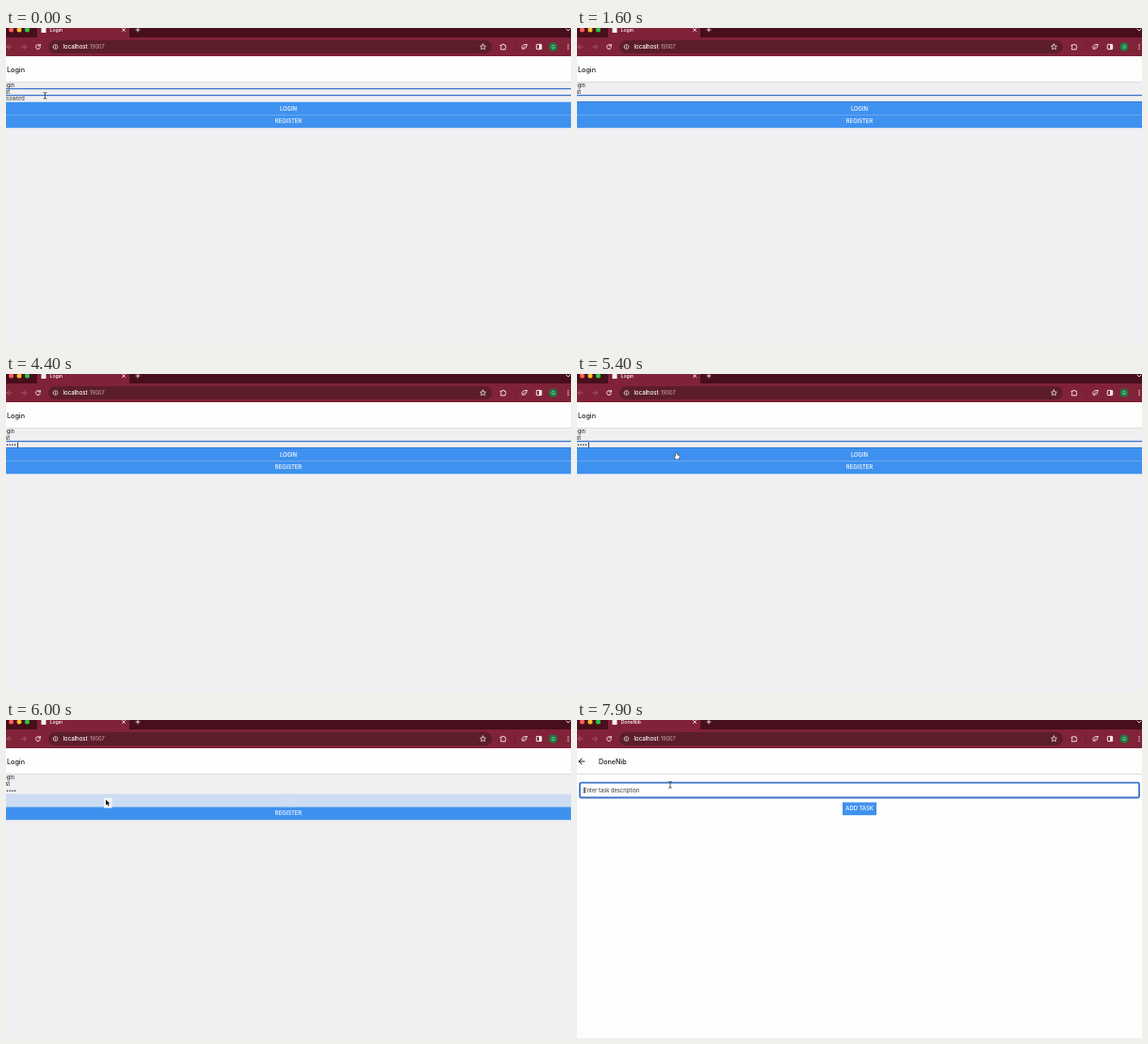
Animation, 600 px wide and 338 px high, one loop 8 s. Source, as an HTML page with a canvas:

```html
<!DOCTYPE html>
<html lang="en">
<head>
<meta charset="utf-8">
<style>
  html, body { margin: 0; width: 100%; height: 100%; overflow: hidden; }
  canvas { display: block; }
</style>
</head>
<body>
<canvas width="600" height="338"></canvas>
<script>
const ctx = document.querySelector('canvas').getContext('2d');
const LOOP = 8000, STEP = 100;
const BLUE = '#3f91ef', FOCUS = '#3c74c8', INK = '#1c1c1e', PALE = '#f3e6e9';
const APP = 'DoneNib';

// Moments of the story, in ms
const FOCUS_PASSWORD = 400, PRESS = 5700, RELEASE = 6000, NAVIGATE = 6200, FOCUS_TASK = 6900;
const KEYS = [1000, 1100, 1900, 2500, 3800, 4300];
const MOUSE = [[0, 41.5, 72], [100, 41.5, 72], [500, 42, 75], [4700, 42, 75],
  [5400, 106, 86], [6200, 106, 86], [6600, 99, 69], [LOOP, 99, 69]];

const clamp = v => Math.max(0, Math.min(1, v));
const ease = v => v * v * (3 - 2 * v);
const blinkOn = since => since % 1000 < 500;

function rect(x, y, w, h, color) {
  ctx.fillStyle = color;
  ctx.fillRect(x, y, w, h);
}

function rounded(x, y, w, h, r, fill, stroke, width = 1) {
  ctx.beginPath();
  ctx.roundRect(x, y, w, h, r);
  if (fill) { ctx.fillStyle = fill; ctx.fill(); }
  if (stroke) { ctx.strokeStyle = stroke; ctx.lineWidth = width; ctx.stroke(); }
}

function disc(x, y, r, fill) {
  ctx.beginPath();
  ctx.arc(x, y, r, 0, 7);
  ctx.fillStyle = fill;
  ctx.fill();
}

function path(d, x, y, { fill, stroke, width = 0.9 }) {
  const shape = new Path2D(d);
  ctx.save();
  ctx.translate(x, y);
  ctx.lineWidth = width;
  ctx.lineJoin = ctx.lineCap = 'round';
  if (stroke) { ctx.strokeStyle = stroke; ctx.stroke(shape); }
  if (fill) { ctx.fillStyle = fill; ctx.fill(shape); }
  ctx.restore();
}

function text(str, x, baseline, size, color, weight = 400, align = 'left') {
  ctx.font = `${weight} ${size}px Inter, sans-serif`;
  ctx.textAlign = align;
  ctx.fillStyle = color;
  ctx.fillText(str, x, baseline);
}

function drawBrowser(title) {
  rect(0, 0, 600, 10, '#470e1b');
  rect(0, 10, 600, 20, '#802238');
  rounded(33, -6, 98, 22, 4, '#802238');
  ['#fe5f57', '#febc2e', '#28c840'].forEach((c, i) => disc(5.5 + i * 8.5, 2, 2.5, c));
  rect(37.5, -1, 5, 6, '#f4f4f4');
  text(title, 46.5, 4, 5.2, '#fff', 500);

  const line = (d, x, y, stroke = PALE, width) => path(d, x, y, { stroke, width });
  line('M-1.5-1.5L1.5 1.5M1.5-1.5L-1.5 1.5', 125, 2);
  line('M-2 0H2M0-2V2', 140, 2);
  line('M-2-1L0 1L2-1', 597, 2);
  line('M2.5 0H-2.5M0-2.5L-2.5 0L0 2.5', 3.5, 20, '#aa5d6d');
  line('M-2.5 0H2.5M0-2.5L2.5 0L0 2.5', 19, 20, '#aa5d6d');
  line('M2-1.4A2.4 2.4 0 1 0 2.4.6M2.3-2.6V-1H.6', 34, 20, PALE, 1);

  rounded(45, 13, 471, 14, 7, '#5c1d2b');
  line('M-2.4 0A2.4 2.4 0 1 0 2.4 0A2.4 2.4 0 1 0-2.4 0M0-.1V1.2M0-1.2V-1.1', 52.5, 20, PALE, 0.7);
  text('localhost', 60.5, 22.2, 6, '#fff', 500);
  text(':19007', 87, 22.2, 5.7, '#c9a4ad');
  line('M0-3L.9-1L3-.8L1.4.6L1.9 2.7L0 1.6L-1.9 2.7L-1.4.6L-3-.8L-.9-1Z', 506.5, 20, PALE, 0.8);
  line('M-2.6-1.8H-1A1 1 0 0 1 1-1.8H2.3V-.4A1 1 0 0 1 2.3 1.4V2.8H-2.6V1.4A1 1 0 0 0-2.6-.4Z', 528, 20, PALE, 1);
  rect(540, 16, 0.7, 8, '#5c1d2b');
  line('M2.5-2.5C-1-2.6-2.6-1.4-2.6.3C-2.6 3.2 2.6 3.6 2.5-2.5ZM-2.4 2.4L.6-.4', 550.5, 20);
  rounded(563.3, 17.4, 5.4, 5.2, 0.6, null, PALE, 1);
  rect(566, 17.4, 2.7, 5.2, PALE);
  disc(581, 20, 4.6, '#1d7b43');
  text('G', 581, 21.8, 5, '#d5efdc', 400, 'center');
  [-2.2, 0, 2.2].forEach(dy => disc(597, 20 + dy, 0.7, PALE));
}

function drawHeader(title, x) {
  rect(0, 30, 600, 27, '#fefefe');
  rect(0, 57, 600, 1, '#dcdcde');
  text(title, x, 46.8, 7.2, INK, 500);
}

function drawButton(label, x, y, w, h, opacity = 1) {
  ctx.globalAlpha = opacity;
  rect(x, y, w, h, BLUE);
  text(label, x + w / 2, y + h / 2 + 2.1, 5.9, '#fff', 500, 'center');
  ctx.globalAlpha = 1;
}

function drawLogin(t) {
  rect(0, 30, 600, 308, '#f0eff1');
  drawHeader('Login', 1);
  text('Login', -6, 63.2, 5.75, INK);
  text('test', -6, 70.3, 5.75, INK);

  const typed = KEYS.filter(k => k <= t).length;
  if (!typed) text('Password', -6.8, 77.2, 5.75, '#333');
  for (let i = 0; i < typed; i++) disc(-4 + i * 2.7, 75.3, 0.8, INK);

  if (t < PRESS + STEP) {
    const top = t < FOCUS_PASSWORD ? 64.5 : 71.5;
    rect(0, top - 0.6, 600, 1.3, FOCUS);
    rect(0, top + 6.4, 600, 1.3, FOCUS);
    const since = t - (typed ? KEYS[typed - 1] : FOCUS_PASSWORD);
    if (typed && blinkOn(since)) rect(-2.5 + typed * 2.7 - 1.5, 72.5, 0.8, 5.5, INK);
  }

  const pressed = clamp((t - PRESS) / 150) - clamp((t - RELEASE) / 250);
  drawButton('LOGIN', 0, 78.7, 600, 13.8, 1 - 0.8 * pressed);
  drawButton('REGISTER', 0, 92.5, 600, 13.7);
}

function drawTasks(t) {
  rect(0, 30, 600, 308, '#fdfdfe');
  drawHeader(APP, 23);
  path('M3 0H-3M0-3L-3 0L0 3', 5, 44, { stroke: INK, width: 1 });
  const focused = t >= FOCUS_TASK;
  if (focused) rounded(3, 66.7, 594, 15.8, 1.5, '#fff', FOCUS, 1.8);
  else rounded(2.5, 66.5, 595, 16, 0, '#fff', '#a2a2a4');
  text('Enter task description', 7.2, 76.8, 5.75, '#333');
  if (focused && blinkOn(t - FOCUS_TASK)) rect(7.3, 71.5, 0.8, 6.5, INK);
  drawButton('ADD TASK', 282, 87.5, 36, 13.7);
}

function mouseAt(t) {
  const i = MOUSE.findIndex(key => key[0] > t);
  const [t0, x0, y0] = MOUSE[i - 1], [t1, x1, y1] = MOUSE[i];
  const p = ease((t - t0) / (t1 - t0));
  return [x0 + (x1 - x0) * p, y0 + (y1 - y0) * p];
}

function drawMouse(t) {
  if (t >= KEYS[0] && t < 4800) return;
  const [x, y] = mouseAt(t);
  const onTasks = t >= NAVIGATE;
  const overButton = !onTasks && y > 78.5;
  const overInput = onTasks ? y < 82 : !overButton;
  if (overInput) {
    path('M-1.5-3.5Q0-3.5 0-2.5Q0-3.5 1.5-3.5M0-2.5V2.5M-1.5 3.2Q0 3.2 0 2.3Q0 3.2 1.5 3.2', x, y,
      { stroke: '#333', width: 0.8 });
  } else if (overButton && t < PRESS + STEP) {
    path('M-1.2-2.6Q-.4-3.4.2-2.4L.4-.8L2-.5Q3 0 2.7 1.5L2 3.4H-1L-2.7 1Q-2.5 0-1.2.8Z', x, y + 1,
      { fill: '#fff', stroke: '#283447', width: 1.2 });
  } else {
    if (overButton) rect(104, 83, 8.5, 10.5, '#f4f4f5');
    path('M0 0V6L1.4 4.8L2.4 7L3.5 6.5L2.5 4.4H4.3Z', x, y - 1.5,
      { fill: '#111', stroke: '#fff', width: 1 });
  }
}

function frame(now) {
  const t = Math.floor(now % LOOP / STEP) * STEP;
  const onTasks = t >= NAVIGATE;
  drawBrowser(onTasks ? APP : 'Login');
  (onTasks ? drawTasks : drawLogin)(t);
  drawMouse(t);
  requestAnimationFrame(frame);
}
requestAnimationFrame(frame);
</script>
</body>
</html>
```
